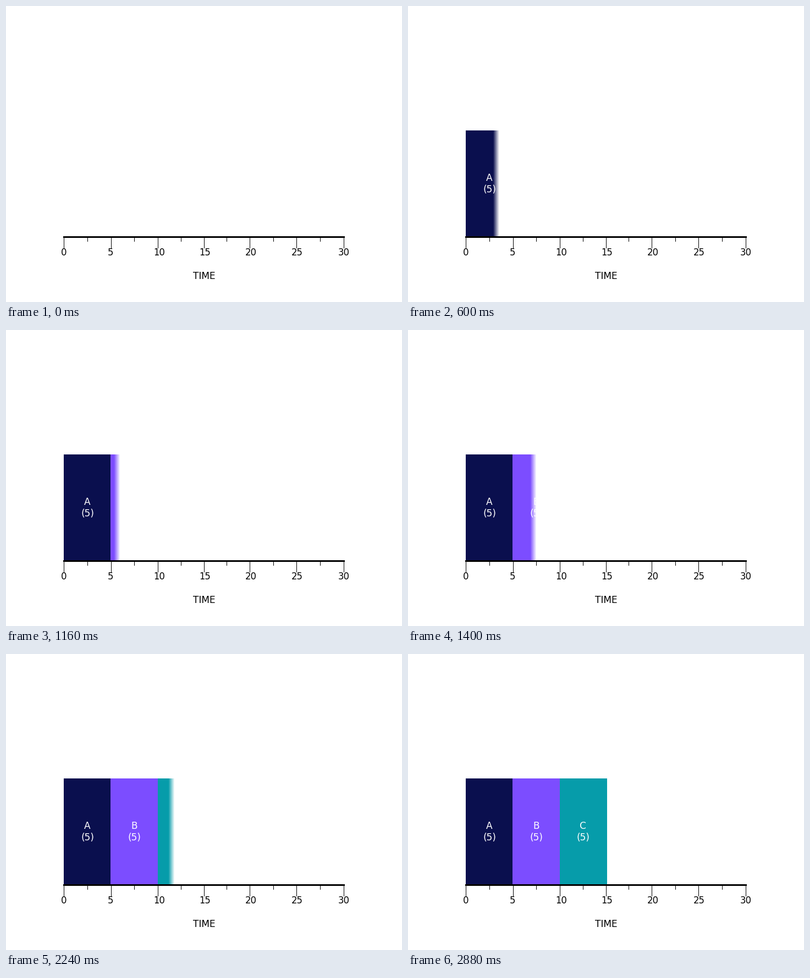
Animation, 720 px wide and 540 px high, one loop 3.68 s. Source, as a matplotlib script:

```python
import numpy as np
import matplotlib.pyplot as plt
from matplotlib.animation import FuncAnimation
from matplotlib.colors import to_rgb
from matplotlib.patches import Rectangle

W, H, DPI = 720, 540, 100
FRAMES, INTERVAL = 92, 40
SPEED, FADE = 4.35, 11      # wipe: pixels per frame, soft edge width
FIRST, PERIOD = 1, 24       # frame where the first wipe starts, gap between wipes
TOP, BASE = 227, 421

plt.rcParams["font.family"] = "DejaVu Sans"
fig = plt.figure(figsize=(W / DPI, H / DPI), dpi=DPI, facecolor="white")
ax = fig.add_axes([0, 0, 1, 1])
ax.axis("off")


def box(x, y, w, h):
    ax.add_patch(Rectangle((x, y), w, h, fc="black", lw=0, zorder=4))


def label(x, y, text, px, color="black"):
    ax.text(x, y, text, fontsize=px * 72 / DPI, color=color,
            ha="center", va="baseline", zorder=5)


class Bar:
    def __init__(self, name, x0, x1, color, start, mid):
        self.x = np.arange(x0, x1) + 0.5
        self.x0, self.start = x0, start
        self.rgba = np.zeros((1, x1 - x0, 4))
        self.rgba[..., :3] = to_rgb(color)
        self.img = ax.imshow(self.rgba, extent=(x0, x1, BASE, TOP),
                             aspect="auto", interpolation="nearest", zorder=2)
        label(mid, 319, name, 17, "white")
        label(mid + 0.3, 340, "(5)", 17, "white")

    def wipe(self, frame):
        front = self.x0 + SPEED * max(0, frame - self.start)
        self.rgba[0, :, 3] = np.clip((front - self.x) / FADE, 0, 1)
        self.img.set_data(self.rgba)
        return self.img


specs = [("A", 105, 192, "#0a0f4e", 148),
         ("B", 190, 277, "#7c4dff", 233),
         ("C", 276, 362, "#069caa", 318)]
bars = [Bar(name, x0, x1, color, FIRST + PERIOD * k, mid)
        for k, (name, x0, x1, color, mid) in enumerate(specs)]

# time axis
box(104, 420, 512, 3)
for x in (105, 191, 276, 360, 443, 528, 614):
    box(x, 423, 1, 19)
for x in (148, 233, 318, 401, 486, 571):
    box(x, 423, 1, 7)
for k, x in enumerate((105, 190.3, 278.5, 362, 445.5, 529, 614.5)):
    label(x, 455, str(5 * k), 16.5)
label(360, 498, "TIME", 17)

ax.set_xlim(0, W)
ax.set_ylim(H, 0)


def update(frame):
    return [bar.wipe(frame) for bar in bars]


anim = FuncAnimation(fig, update, frames=FRAMES, interval=INTERVAL,
                     repeat=True, repeat_delay=0, blit=False)
plt.show()
```
